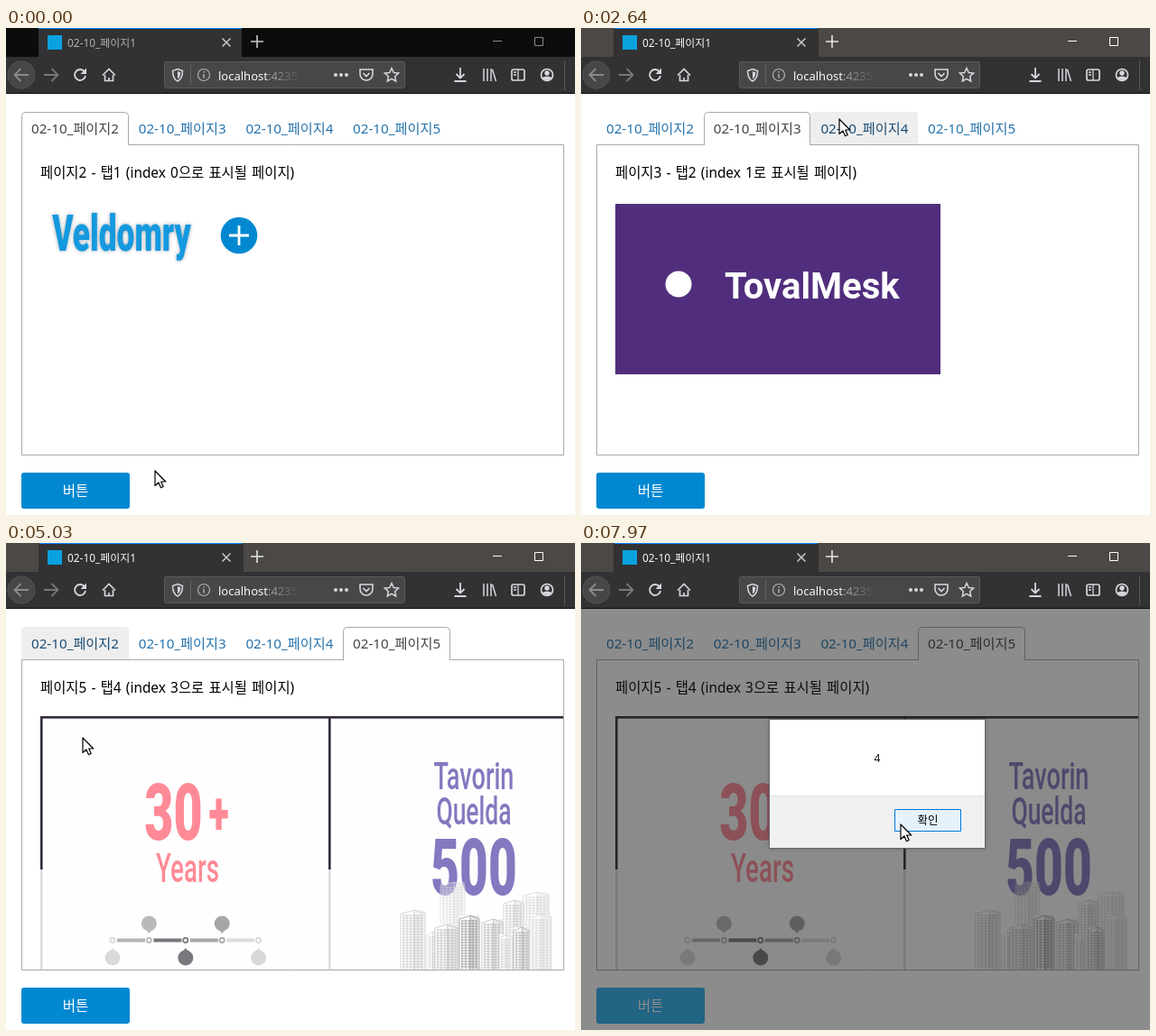
An HTML page with a canvas for the animation above (8 s loop, 630x540 px).

```html
<!DOCTYPE html>
<html lang="ko">
<head>
<meta charset="utf-8">
<title>02-10_페이지1</title>
<style>
html, body { margin: 0; width: 100%; height: 100%; overflow: hidden; background: #fff; }
canvas { display: block; }
</style>
</head>
<body>
<canvas id="stage" width="630" height="540"></canvas>
<script>
const ctx = document.getElementById('stage').getContext('2d');
const LOOP = 8000;
const UI = '"Noto Sans", "Noto Sans CJK KR", "Noto Sans CJK", sans-serif';
const POSTER = 'Roboto, "Noto Sans", sans-serif';
const NARROW = 0.63; // one condensed face for all poster lettering
const BLUE = '#0288d1';

// Cursor moves: start, end, steps, x, y
const MOVES = [
  [230, 690, 7, 150, 101], [1160, 1320, 3, 88, 101], [1640, 1720, 2, 186, 104],
  [2640, 2640, 1, 286, 101], [2710, 2710, 1, 300, 103], [3190, 3250, 2, 413, 105],
  [3330, 3330, 1, 424, 106], [3490, 3720, 4, 86, 110], [4960, 5190, 4, 81, 533],
  [5340, 5420, 2, 81, 524], [7270, 7970, 10, 354, 312]
];
// Tab hovers: start, end, tab, hand from, hand to
const HOVERS = [
  [690, 1230, 1, 690, 1160], [1720, 2110, 1, 1720, 2030], [2640, 2800, 2, 2710, 2800],
  [3250, 3410, 3, 3330, 3410], [3720, 5040, 0, 3720, 4960]
];
const SWITCHES = [2110, 2800, 3410];

const between = (t, a, b) => t >= a && t < b;
const smooth = p => p * p * (3 - 2 * p);

function rect(x, y, w, h, color) {
  ctx.fillStyle = color;
  ctx.fillRect(x, y, w, h);
}

function rounded(x, y, w, h, r, fill, stroke, width = 1) {
  ctx.beginPath();
  ctx.roundRect(x, y, w, h, r);
  if (fill) { ctx.fillStyle = fill; ctx.fill(); }
  if (stroke) { ctx.strokeStyle = stroke; ctx.lineWidth = width; ctx.stroke(); }
}

function circle(x, y, r, fill, stroke, width = 1.5) {
  ctx.beginPath();
  ctx.arc(x, y, r, 0, Math.PI * 2);
  if (fill) { ctx.fillStyle = fill; ctx.fill(); }
  if (stroke) { ctx.strokeStyle = stroke; ctx.lineWidth = width; ctx.stroke(); }
}

function line(d, color, width = 1.5) {
  ctx.strokeStyle = color;
  ctx.lineWidth = width;
  ctx.stroke(new Path2D(d));
}

function shape(d, color) {
  ctx.fillStyle = color;
  ctx.fill(new Path2D(d));
}

function fadeDown(top, bottom, from, to) {
  const g = ctx.createLinearGradient(0, top, 0, bottom);
  g.addColorStop(0, from);
  g.addColorStop(1, to);
  return g;
}

function text(s, x, y, font, color, align = 'left') {
  ctx.font = font;
  ctx.fillStyle = color;
  ctx.textAlign = align;
  ctx.fillText(s, x, y);
}

function poster(s, x, y, weight, size, color) {
  ctx.save();
  ctx.translate(x, y);
  ctx.scale(NARROW, 1);
  text(s, 0, 0, `${weight} ${size}px ${POSTER}`, color, 'center');
  ctx.restore();
}

function seeded(seed) {
  return () => (seed = (seed * 16807) % 2147483647) / 2147483647;
}

function drawTitleBar(focused) {
  const ink = focused ? '#f9f9fa' : '#b1b1b3';
  const left = focused ? 37 : 36;
  rect(0, 0, 630, 32, focused ? '#4b4845' : '#0c0c0c');
  if (focused) rect(left - 1, 0, 227, 32, '#353331');
  rect(left, 0, 225, 32, '#323234');
  rect(left, 0, 225, 1, '#0a84ff');
  rect(46, 8, 16, 16, '#0aa2de');
  text('02-10_페이지1', 68, 20.5, `11.9px ${UI}`, ink);
  line('M239.5 11.5l9 9m0-9l-9 9', '#c9c9cb', 1.5);
  line('M271 15h14M278 8v14', focused ? '#e6e6e6' : '#c9c9cb', 1.6);
  const control = focused ? '#fff' : '#8a8a8a';
  line('M539 14.5h10M585.5 10.5h9v9h-9z', control, 1);
}

function drawToolbar() {
  const ink = '#d7d7db';
  rect(0, 32, 630, 40, '#323234');
  rect(0, 72, 630, 1, '#0c0c0d');
  circle(17, 52, 15.2, '#474749', '#525255', 1);
  line('M9.500 52H25M16.500 45L9.500 52L16.500 59', '#8b8b8d', 1.8);
  line('M42 52H57.500M50.500 45L57.500 52L50.500 59', '#77777a', 1.8);
  line('M87 48.5A6 6 0 1 0 88 53', ink, 1.9);
  shape('M89 44.5v6.5h-6.5z', ink);
  line('M107 52.500L114 45.500L121 52.500M109.500 52V58.500H118.500V52M114 59v-4', ink, 1.7);

  rounded(175.5, 37.5, 266, 29, 2, '#474749', '#5b5b5e');
  line('M190 45.5l5.5 2c0 6-1.5 9.5-5.5 11.5c-4-2-5.5-5.5-5.5-11.5z', ink, 1.5);
  shape('M190 48v8.5c2-1.5 3.200-4 3.200-7.300z', ink);
  line('M204.5 41v22', '#626265', 1);
  circle(219, 52, 6.5, null, '#b1b1b3', 1.2);
  line('M219 51v4.5M219 48v1.5', '#b1b1b3', 1.5);
  const url = `13px ${UI}`;
  text('localhost', 235, 57.5, url, '#f9f9fa');
  const port = 235 + ctx.measureText('localhost').width;
  const fade = ctx.createLinearGradient(288, 0, 325, 0);
  fade.addColorStop(0, '#b1b1b3');
  fade.addColorStop(1, '#4b4b4d');
  text(':4235', port, 57.5, url, fade);
  for (const x of [365, 371, 377]) circle(x, 52, 2, ink);
  line('M392 46h14v5a7 7 0 0 1-14 0zM395.5 50l3.5 3.5l3.5-3.5', ink, 1.6);
  line('M427 44.5l2.300 5l5.300.6l-4 3.600l1.100 5.300l-4.700-2.700l-4.700 2.700l1.100-5.300l-4-3.600l5.300-.6z', ink, 1.5);

  line('M503 44v11M498.5 51l4.5 4.5l4.5-4.5M496.5 59h13', ink, 1.8);
  line('M529 45v14M533 45v14M537 45v14M538.5 46l4 13', ink, 1.5);
  rounded(560, 46, 14, 12, 2, null, ink, 1.7);
  line('M567 46v12M562 49h3M562 52h3', ink, 1.3);
  circle(599, 52, 6.5, null, ink, 1.7);
  circle(599, 50, 2.7, ink);
  shape('M593.5 55q5.5-3 11 0a6.5 6.5 0 0 1-11 0z', ink);
  rect(618, 36, 1, 33, '#58585b');
}

function drawTabs(active, hover) {
  rounded(17.5, 129.5, 600, 344, 0, '#fff', '#a9a9a9');
  for (let i = 0; i < 4; i++) {
    const x = Math.round(17 + i * 118.7);
    const w = Math.round(17 + (i + 1) * 118.7) - x;
    let ink = '#2573ad';
    if (i === active) {
      ink = '#444';
      rounded(x + 0.5, 93.5, w - 1, 40, [4, 4, 0, 0], '#fff', '#a9a9a9');
      rect(x - 0.5, 130, w + 1, 6, '#fff');
    } else if (i === hover) {
      ink = '#1b4d75';
      rounded(x, 93, w, 36, [4, 4, 0, 0], '#eee');
    }
    text('02-10_페이지' + (i + 2), 28 + i * 118.7, 116.5, `15.2px ${UI}`, ink);
  }
  line('M17.5 130V473', '#a9a9a9', 1);
}

function drawHome() {
  ctx.save();
  ctx.shadowColor = 'rgba(90,110,125,.6)';
  ctx.shadowBlur = 4;
  poster('Veldomry', 128, 247, 900, 56, '#1499df');
  ctx.restore();
  circle(258, 230, 20.3, BLUE);
  line('M247 230h22M258 219v22', '#fff', 2.8);
}

function drawBanner() {
  rect(38, 195, 360, 189, '#512e7d');
  circle(108, 284, 14.5, '#fff');
  text('TovalMesk', 159, 300, `700 40px ${POSTER}`, '#fff');
}

function drawPlanet() {
  ctx.save();
  ctx.beginPath();
  ctx.arc(637, 346, 82, 0, Math.PI * 2);
  ctx.clip();
  rect(555, 260, 70, 90, fadeDown(266, 344, '#1a9fce', '#2b83bd'));
  rect(555, 340, 70, 24, '#2f6ea6');
  rect(555, 358, 70, 72, fadeDown(358, 426, '#6a3193', '#4a2670'));
  shape('M583 302q2-8 9-6q4-9 11-3q8-1 8 9z', '#d9eef6');
  shape('M565 340l28-13l27 8v19l-32 3z', '#7fb6d3');
  shape('M588 327l14-9l18 5v18l-22 3z', '#e3e8ee');
  shape('M588 327l10 4v13l-10-4z', '#aebfd0');
  ctx.restore();
}

function drawSpace() {
  rect(38, 194, 579, 279, fadeDown(194, 473, '#1d1024', '#281738'));
  const rnd = seeded(77);
  for (let i = 0; i < 34; i++) {
    circle(40 + rnd() * 575, 196 + rnd() * 275, 0.5 + rnd() * 0.6, '#b9aec2');
  }
  ctx.strokeStyle = '#532a68';
  ctx.lineWidth = 1.1;
  for (const [x, y, rx, ry, turn] of [[580, 345, 180, 69, 0.05], [640, 352, 240, 58, 0.15]]) {
    ctx.beginPath();
    ctx.ellipse(x, y, rx, ry, turn, 0, Math.PI * 2);
    ctx.stroke();
  }
  drawPlanet();
  ["LET'S", 'EMPOWER', 'DEVELOPERS'].forEach((word, i) =>
    text(word, 48.5, 237 + i * 60, `700 44.8px ${POSTER}`, '#fff'));
  text('With TovalMesk', 49, 418, `700 25.4px ${POSTER}`, '#fff');
  circle(528.5, 249, 24.5, '#1c9fda');
  circle(471, 328, 25.5, '#1e89c2');
  circle(531, 455, 29.5, '#e11522');
  text('Veldomry', 527, 286, `700 10.3px ${POSTER}`, '#fff', 'center');
  text('Zukpa', 471, 368, `700 10.3px ${POSTER}`, '#fff', 'center');
}

function drawTimeline() {
  const tones = ['#dadada', '#b9b9b9', '#78777d', '#a6a6a6', '#d8d8d8'];
  const bars = ['#b5b5b5', '#78777d', '#a6a6a6', '#dcdcdc'];
  for (let i = 0; i < 5; i++) {
    const x = 118 + i * 40.4;
    const dir = i % 2 ? 1 : -1;
    const y = 441 - dir * 19;
    if (i < 4) rect(x + 5, 438.5, 31, 4, bars[i]);
    circle(x, 440.5, 2.6, '#fff', tones[i], 1.7);
    circle(x, y, 8.5, tones[i]);
    shape(`M${x - 3} ${y + dir * 7}h6l-3 ${dir * 4}z`, tones[i]);
  }
}

function drawSkyline() {
  const veil = fadeDown(385, 420, 'rgba(255,255,255,.25)', 'rgba(255,255,255,.85)');
  // x, width, top, grey
  const towers = [
    [437, 27, 407, 190], [466, 12, 431, 205], [481, 27, 376, 212], [573, 28, 387, 205],
    [551, 22, 396, 190], [475, 25, 423, 175], [502, 22, 413, 125], [527, 23, 417, 165],
    [546, 15, 434, 200], [562, 17, 426, 155], [580, 24, 412, 205]
  ];
  for (const [x, w, top, grey] of towers) {
    const ridge = x + w * 0.55;
    rect(x, top, w, 473 - top, veil);
    rect(ridge, top, w * 0.45, 473 - top, `rgba(${grey},${grey},${grey},.2)`);
    let d = `M${x} 473V${top + 4}L${ridge} ${top}L${x + w} ${top + 4}V473M${ridge} ${top}V473`;
    for (let y = top + 6; y < 473; y += 3) d += `M${x + 2} ${y}h${w - 4}`;
    for (let c = x + 3; c < x + w; c += 4) d += `M${c} ${top + 5}V473`;
    line(d, `rgb(${grey},${grey},${grey})`, 0.6);
  }
}

function drawCards() {
  const frame = '#352b3d', pink = '#ff8a97', violet = '#8279c0';
  rect(38, 192, 579, 281, '#fefefe');
  for (const x of [38, 357]) {
    rect(x, 192, 2.6, 170, frame);
    rect(x, 362, 2.6, 111, '#dcdcdc');
  }
  rect(38, 192, 579, 2.6, frame);
  poster('30', 185.5, 329, 900, 88, pink);
  poster('+', 235.5, 323, 900, 66, pink);
  poster('Years', 201, 376, 500, 44, pink);
  drawTimeline();
  poster('Tavorin', 518, 273, 500, 43, violet);
  poster('Quelda', 518, 312, 500, 42, violet);
  poster('500', 518, 390, 900, 87, violet);
  drawSkyline();
}

const PAGES = [
  ['페이지2 - 탭1 (index 0으로 표시될 페이지)', drawHome],
  ['페이지3 - 탭2 (index 1로 표시될 페이지)', drawBanner],
  ['페이지4 - 탭3 (index 2로 표시될 페이지)', drawSpace],
  ['페이지5 - 탭4 (index 3으로 표시될 페이지)', drawCards]
];

function drawPage(index) {
  const [caption, draw] = PAGES[index];
  ctx.save();
  ctx.wordSpacing = '1.2px';
  text(caption, 38, 165.5, `15.4px ${UI}`, '#000');
  ctx.restore();
  ctx.save();
  ctx.beginPath();
  ctx.rect(18, 130, 599, 343);
  ctx.clip();
  draw();
  ctx.restore();
}

function drawButton(t) {
  if (between(t, 6030, 6170)) rounded(16, 492, 122, 42, 4, '#8fd2f6');
  const fill = t >= 6170 ? '#28b0f0' : t >= 5340 ? '#0da4ed' : BLUE;
  rounded(17, 493, 120, 40, 3, fill);
  text('버튼', 77, 518.5, `15.6px ${UI}`, '#fff', 'center');
}

function drawDialog(hover) {
  rect(0, 73, 630, 467, 'rgba(26,26,26,.5)');
  ctx.save();
  ctx.shadowColor = 'rgba(0,0,0,.35)';
  ctx.shadowBlur = 5;
  rect(209, 196, 238, 142, '#fff');
  ctx.restore();
  rect(209, 280, 238, 58, '#f0f0f0');
  rect(209, 280, 238, 1, '#dfdfdf');
  rounded(208.5, 195.5, 239, 143, 0, null, '#666');
  text('4', 328, 243, `12px ${UI}`, '#111', 'center');
  rounded(347.5, 295.5, 73, 24, 0, hover ? '#e5f1fb' : '#e1e1e1', '#0078d7');
  if (!hover) rounded(348.5, 296.5, 71, 22, 0, null, '#0078d7');
  text('확인', 384, 311.5, `12.5px ${UI}`, '#000', 'center');
}

function cursorAt(t) {
  let x = 165, y = 491;
  for (const [start, end, steps, toX, toY] of MOVES) {
    if (t < start) break;
    const gap = (end - start) / (steps - 1) || 1;
    const done = Math.min(1, (1 + Math.floor((t - start + 5) / gap)) / steps);
    const p = steps > 4 ? smooth(done) : done;
    x += (toX - x) * p;
    y += (toY - y) * p;
  }
  return [Math.round(x), Math.round(y)];
}

function drawCursor(x, y, hand) {
  const path = new Path2D(hand
    ? 'M5 12V2.2a1.6 1.6 0 0 1 3.2 0V7.5l1.6-.5l1.4 1l1.5-.2l1.2 1l1.3.2V14.5l-1.8 3.5v3H6v-2.5L1.2 13.5q-1.7-2.8.6-3z'
    : 'M0 0V16.5L3.9 13L6.5 18.7L9.2 17.5L6.7 12H11.8Z');
  ctx.save();
  ctx.translate(hand ? x - 6 : x, y);
  ctx.lineJoin = 'round';
  ctx.lineWidth = 1.2;
  ctx.fillStyle = '#fff';
  ctx.strokeStyle = '#000';
  ctx.fill(path);
  ctx.stroke(path);
  if (hand) line('M8.2 8v4M11.2 9v3M13.7 9.5v2.5', '#000', 0.9);
  ctx.restore();
}

function draw(t) {
  const page = SWITCHES.filter(s => t >= s).length;
  const over = HOVERS.find(([a, b]) => between(t, a, b));
  const [x, y] = cursorAt(t);
  rect(0, 0, 630, 540, '#fff');
  drawTitleBar(t >= 1950);
  drawToolbar();
  drawTabs(page, over ? over[2] : -1);
  drawPage(page);
  drawButton(t);
  if (t >= 6170) drawDialog(x >= 347 && y < 320);
  drawCursor(x, y, over && between(t, over[3], over[4]));
}

const begin = performance.now();
function tick() {
  draw((performance.now() - begin) % LOOP);
  requestAnimationFrame(tick);
}
tick();
</script>
</body>
</html>
```
